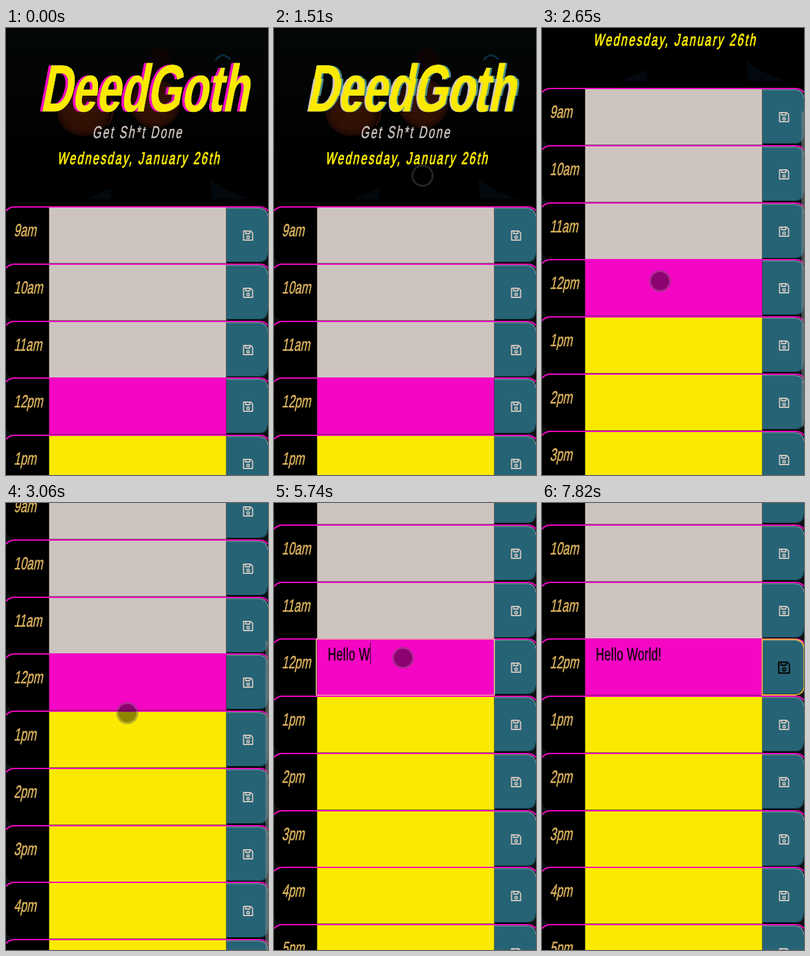
Recreate the animation shown at these times as an HTML page. Size 404x687 px, loop 8000 ms.

```html
<!DOCTYPE html>
<html lang="en">
<head>
<meta charset="utf-8">
<title>Day planner</title>
<style>
  html, body { margin: 0; width: 100%; height: 100%; overflow: hidden; background: #0b1012; }
  svg { display: block; width: 100%; height: 100%; }
  text { font-family: "Liberation Sans", Arial, sans-serif; white-space: pre; }
</style>
</head>
<body>
<svg id="stage" viewBox="0 0 404 687">
  <defs>
    <linearGradient id="night" x2="0" y2="1">
      <stop offset="0" stop-color="#060909"/><stop offset=".7" stop-color="#000"/>
    </linearGradient>
    <radialGradient id="lens">
      <stop offset="0" stop-color="#451805"/><stop offset=".75" stop-color="#3c1305"/><stop offset="1" stop-color="#220a04"/>
    </radialGradient>
    <pattern id="scan" width="4" height="3" patternUnits="userSpaceOnUse">
      <rect width="4" height="1.2" fill="#000" opacity=".55"/>
    </pattern>
    <g id="disk">
      <path d="M-7-7H4L7-4V7H-7ZM-3.8-7V-3H2.6V-7" fill="none" stroke="currentColor" stroke-width="1.9" stroke-linejoin="round"/>
      <circle cy="2.4" r="2" fill="none" stroke="currentColor" stroke-width="1.8"/>
    </g>
  </defs>
  <g id="page">
    <rect width="404" height="276" fill="url(#night)"/>
    <g id="portrait">
      <path d="M214 75Q215 35 238 30Q262 40 254 78Z" fill="#110505"/>
      <ellipse cx="120" cy="129" rx="41" ry="37" fill="url(#lens)"/>
      <path d="M157 97Q172 126 157 150" fill="none" stroke="#3a1006" stroke-width="3"/>
      <ellipse cx="230" cy="116" rx="39" ry="38" fill="url(#lens)"/>
      <path d="M323 50Q333 35 346 48" fill="none" stroke="#0b3a52" stroke-width="3"/>
      <path d="M122 263L162 246V263ZM315 233L342 250 376 263H318Z" fill="#030b12"/>
      <rect width="404" height="263" fill="url(#scan)"/>
    </g>
    <g id="title"></g>
    <g id="rows"></g>
  </g>
  <rect id="thumb" x="400" width="4" height="485" rx="2" fill="#8a8a8a"/>
  <g id="pointer">
    <circle r="15.5" fill="none" stroke="#5a5a5a" stroke-opacity=".42" stroke-width="3"/>
    <circle r="14" fill="#000" fill-opacity=".43"/>
  </g>
</svg>
<script>
const LOOP = 8000, TICK = 67, ROW_TOP = 274, ROW_PITCH = 87.75;
const NARROW = .66, SLANT = -11;
const PINK = '#f406c4', YELLOW = '#fbea00', STONE = '#cec4bf', TEAL = '#256375', GOLD = '#dcb35c';
const $ = id => document.getElementById(id);

function add(parent, tag, attrs = {}, content = '') {
  const node = document.createElementNS('http://www.w3.org/2000/svg', tag);
  for (const key in attrs) node.setAttribute(key, attrs[key]);
  node.textContent = content;
  return parent.appendChild(node);
}

// One shared narrow face with a slightly heavier stroke; headings and labels lean.
function write(parent, content, x, y, size, fill, { slant = SLANT, spacing = 0, ...rest } = {}) {
  return add(parent, 'text', {
    transform: `translate(${x} ${y}) skewX(${slant}) scale(${NARROW} 1)`,
    'font-size': size, 'letter-spacing': spacing, fill, stroke: fill, 'stroke-width': .6, ...rest
  }, content);
}

// Title: three horizontal bands, each with a left and a right ghost.
const bands = [[40, 38], [78, 26], [104, 36]].map(([y, height], i) => {
  const clip = add($('stage').querySelector('defs'), 'clipPath', { id: 'band' + i });
  add(clip, 'rect', { x: 0, y, width: 404, height });
  const group = add(add($('title'), 'g', { 'clip-path': `url(#band${i})` }), 'g');
  const layer = fill => {
    const shift = add(group, 'g');
    write(shift, 'DeedGoth', 52, 127.5, 102, fill, { 'font-weight': 700 });
    return shift;
  };
  return { group, left: layer(PINK), right: layer('#4b8f8f'), face: layer(YELLOW) };
});

// Each pose: band offsets, left ghost offsets, right ghost offsets, left ghost colour.
const poses = [
  [[0, 0, 0], [-4, -4, -4], [0, 0, 0], PINK],
  [[2, -3, 0], [0, -3, 0], [3, 0, 3], PINK],
  [[-4, -2, -3], [0, -3, -2], [3, 3, 2], '#d3c6c2'],
  [[1, 0, 0], [-4, 0, 0], [0, 0, 0], PINK]
];

write($('page'), 'Get Sh*t Done', 133, 169, 26, STONE, { spacing: 3.4 });
write($('page'), 'Wednesday, January 26th', 79, 209, 26, YELLOW, { spacing: 3.6, 'stroke-width': 1 });

const hours = ['9am', '10am', '11am', '12pm', '1pm', '2pm', '3pm', '4pm', '5pm'];
const rows = hours.map((hour, i) => {
  const top = Math.round(ROW_TOP + i * ROW_PITCH);
  const row = add($('rows'), 'g', { transform: `translate(0 ${top})` });
  add(row, 'rect', { width: 404, height: 88, rx: 15, fill: '#000' });
  add(row, 'rect', { x: 66, y: 2, width: 274, height: 86, fill: i < 3 ? STONE : i === 3 ? PINK : YELLOW });
  add(row, 'path', { d: 'M66.5 2V87.5H339.5V2', fill: 'none', stroke: '#2b2024', 'stroke-opacity': .6 });
  add(row, 'path', { d: 'M340 2.5H390Q404 3 404 17V72Q404 86 390 86H340Z', fill: TEAL });
  add(row, 'path', { d: 'M340 3H390Q403 4 403.5 16', fill: 'none', stroke: '#6f8d94', 'stroke-width': 1.3 });
  add(row, 'path', { d: 'M340 85.5H390Q403 85 403.5 72', fill: 'none', stroke: '#143842' });
  add(row, 'path', { d: 'M0 7Q5 1 14 1H390Q399 1 404 7', fill: 'none', stroke: PINK, 'stroke-width': 2 });
  write(row, hour, 12, 46, 27, GOLD);
  const icon = add(row, 'use', { href: '#disk', color: STONE });
  return { row, icon };
});

const active = rows[3];
const fieldRing = add(active.row, 'rect', { x: 65.3, y: 1, width: 274.5, height: 86.5, rx: 1, fill: 'none', stroke: '#f3c79a', 'stroke-width': 1.6 });
const buttonRing = add(active.row, 'path', { d: 'M339.5 1.5H390Q404 3 404 16V73Q404 86 390 87H339.5Z', fill: 'none', stroke: '#f2b632', 'stroke-width': 1.8 });
const note = write(active.row, '', 83, 34, 27, '#16060f', { slant: 0, spacing: .6 });
const caret = add(active.row, 'rect', { y: 6, width: 1.1, height: 34, fill: '#3a0830' });

const MESSAGE = 'Hello World!';
const keyTimes = [4090, 4550, 4680, 4810, 4940, 5470, 5740, 5810, 5940, 6040, 6140, 6470];
const FIELD_FOCUS = 3330, BUTTON_FOCUS = 7540, BLINK = 455;

const scrollKeys = [[1700, 0], [1850, 14], [2110, 60], [2650, 182], [3040, 300], [3150, 329]];
const pointerKeys = [
  [540, 345, 614], [610, 315, 505], [680, 264, 375], [750, 229, 227], [1710, 229, 227],
  [2110, 231, 242], [2310, 228, 282], [2640, 182, 389], [2900, 182, 389], [3000, 187, 345],
  [3130, 187, 298], [3270, 199, 238], [6660, 199, 238], [6730, 211, 238], [7120, 211, 238],
  [7400, 373, 253], [7650, 373, 253], [7760, 425, 250]
];

function sample(keys, t) {
  const next = keys.findIndex(key => key[0] > t);
  if (next < 0) return keys[keys.length - 1].slice(1);
  if (next === 0) return keys[0].slice(1);
  const a = keys[next - 1], b = keys[next], p = (t - a[0]) / (b[0] - a[0]);
  return a.slice(1).map((v, i) => v + (b[i + 1] - v) * p);
}

const move = (node, x, y = 0) => node.setAttribute('transform', `translate(${x} ${y})`);
const show = (node, on) => node.setAttribute('visibility', on ? 'visible' : 'hidden');

function render(t) {
  const scroll = Math.round(sample(scrollKeys, t)[0]);
  move($('page'), 0, -scroll);

  const [shift, left, right, tint] = poses[Math.floor(t / TICK) % poses.length];
  bands.forEach((band, i) => {
    move(band.group, shift[i]);
    move(band.left, left[i]);
    move(band.right, right[i]);
    for (const attr of ['fill', 'stroke']) band.left.firstElementChild.setAttribute(attr, tint);
  });

  $('thumb').setAttribute('y', 4 + scroll * .68);
  $('thumb').setAttribute('opacity', t < 1710 ? 0 : .5 * Math.min(1, Math.max(0, (3550 - t) / 150)));

  const [px, py] = sample(pointerKeys, t);
  move($('pointer'), px, py);
  show($('pointer'), t >= 540 && t < 7760);

  const typed = keyTimes.filter(time => time <= t);
  const inField = t >= FIELD_FOCUS && t < BUTTON_FOCUS;
  const sinceKey = t - (typed.length ? typed[typed.length - 1] : FIELD_FOCUS + 35);
  note.textContent = MESSAGE.slice(0, typed.length);
  caret.setAttribute('x', 83 + (typed.length ? note.getComputedTextLength() * NARROW : 0));
  show(caret, inField && Math.floor(Math.max(0, sinceKey) / BLINK) % 2 === 0);
  show(fieldRing, inField);
  show(buttonRing, t >= BUTTON_FOCUS);

  const hover = t >= 7360;
  rows.forEach(({ icon }) => {
    const on = hover && icon === active.icon;
    icon.setAttribute('color', on ? '#080808' : STONE);
    icon.setAttribute('transform', `translate(373.3 45) scale(${on ? 1.18 : 1})`);
  });
}

const start = performance.now();
function frame() {
  render((performance.now() - start) % LOOP);
  requestAnimationFrame(frame);
}
frame();
</script>
</body>
</html>
```
